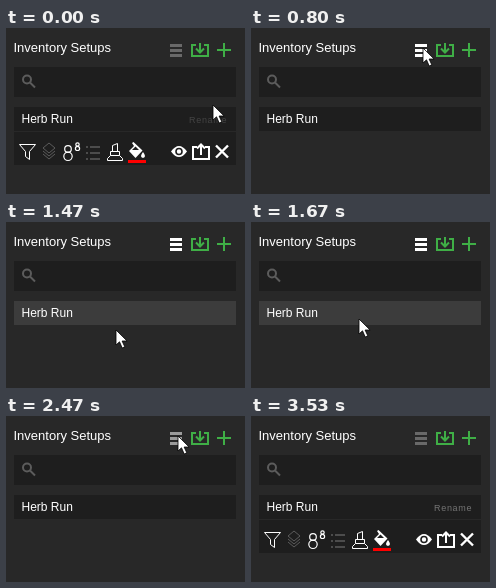
An HTML page for the animation above (4.14 s loop, 239 px wide and 166 px high).

```html
<!DOCTYPE html>
<html lang="en">
<head>
<meta charset="utf-8">
<title>Inventory Setups</title>
<style>
  html, body { margin: 0; width: 100%; height: 100%; overflow: hidden; background: #282828; }
  svg { display: block; width: 100%; height: 100%; }
  text { font-family: "Liberation Sans", Arial, sans-serif; fill: #fff; }
  .line { fill: none; stroke: #fff; }
  .green { fill: none; stroke: #3fae46; stroke-width: 2; }
  .dim { fill: none; stroke: #5c5c5c; }
</style>
</head>
<body>
<svg viewBox="0 0 239 166">
  <rect width="239" height="166" fill="#282828"/>
  <text x="7.5" y="24" font-size="13">Inventory Setups</text>
  <path id="menu" d="M164 16h12v3h-12zM164 21h12v3h-12zM164 26h12v3h-12z"/>
  <path class="green" d="M190 17h-4v11h16v-11h-4M194 15v9M190 20.5l4 4 4-4"/>
  <path class="green" d="M211 22h14M218 15v14"/>

  <rect x="8" y="39" width="222" height="30" fill="#1e1e1e"/>
  <g class="dim" stroke-width="2">
    <circle cx="21" cy="51.5" r="4"/>
    <path d="M24 54.5l5 5"/>
  </g>

  <rect id="row" x="8" y="79" width="222" height="24"/>
  <text x="15.5" y="95" font-size="12">Herb Run</text>

  <g id="details">
    <text id="rename" x="183" y="95" font-size="9" letter-spacing=".7">Rename</text>
    <rect x="8" y="104" width="222" height="33" fill="#1e1e1e"/>
    <path class="line" d="M13.5 116.5h16l-6 7v8l-4-3v-5z"/>
    <path class="dim" d="M43 115l6 5-6 5-6-5zM37 123l6 5 6-5M37 126l6 5 6-5"/>
    <g class="line" stroke-width="1.2">
      <circle cx="62" cy="121" r="3.3"/>
      <circle cx="62" cy="128.3" r="4.2"/>
      <circle cx="71.5" cy="116.5" r="1.7"/>
      <circle cx="71.5" cy="120.4" r="2.1"/>
    </g>
    <path class="dim" stroke-width="1.5" d="M80 119h2m2 0h10M80 125h2m2 0h10M80 131h2m2 0h10"/>
    <path class="line" d="M106.5 123.5v-6l5-2v8M104.5 127.5v-4h9v4M101.5 132.5v-2l3-3h9l3 3v2z"/>
    <path fill="#fff" d="M126 115l1.5-1 9 8.5-7 7.5-6.5-7 5-5zM137 124q4 5 0 6-4-1 0-6z"/>
    <path fill="#1e1e1e" d="M126 122l3.5-3.5 3.5 3.5z"/>
    <rect x="122" y="132" width="18" height="3" fill="#f00"/>
    <path fill="#fff" d="M165 123.5q8-11 16 0-8 11-16 0z"/>
    <circle cx="173" cy="123.5" r="3" fill="#fff" stroke="#1e1e1e" stroke-width="1.6"/>
    <path class="line" stroke-width="2" d="M191 119h-4v12h16v-12h-4M195 127v-10M191 120.5l4-4 4 4"/>
    <path class="line" stroke-width="2.4" d="M210 117.5l12 12M222 117.5l-12 12"/>
  </g>

  <path id="cursor" fill="#fff" stroke="#000" stroke-width=".8"
    d="M0 0v15l3.5-3.2 2.7 6.2 2.6-1.2-2.7-5.8h5z"/>
</svg>
<script>
const LOOP = 4140, TICK = 1000 / 15;
const [menu, row, details, rename, cursor] =
  ["menu", "row", "details", "rename", "cursor"].map(id => document.getElementById(id));

// Pointer path: tick, x, y
const path = [
  [0, 207, 77], [7, 172, 20], [17, 172, 20], [20, 130, 82], [22, 110, 108],
  [25, 108, 97], [28, 108, 97], [36, 172, 20], [41, 172, 20],
  [46, 139, 100], [49, 139, 100], [53, 111, 170], [63, 111, 170]
];
const ease = u => u * u * (3 - 2 * u);
const within = (tick, from, to) => tick >= from && tick < to;

function pointerAt(tick) {
  const next = Math.max(1, path.findIndex(key => key[0] >= tick));
  const [t0, x0, y0] = path[next - 1], [t1, x1, y1] = path[next];
  const u = (tick - t0) / (t1 - t0);
  const p = within(tick, 17, 26) ? u : ease(u);
  return [x0 + (x1 - x0) * p, y0 + (y1 - y0) * p].map(Math.round);
}

function menuColor(tick) {
  if (within(tick, 6, 11) || within(tick, 37, 39)) return "#9b9b9b";
  return within(tick, 11, 37) ? "#fff" : "#696969";
}

function draw(ms) {
  const tick = Math.floor((ms % LOOP + 5) / TICK);
  cursor.setAttribute("transform", `translate(${pointerAt(tick)})`);
  menu.setAttribute("fill", menuColor(tick));
  row.setAttribute("fill", within(tick, 20, 32) ? "#3c3c3c" : "#1e1e1e");
  rename.style.fill = tick < 2 ? "#444" : "#747474";
  details.style.display = within(tick, 12, 39) ? "none" : "";
}

const start = performance.now();
function frame() {
  draw(performance.now() - start);
  requestAnimationFrame(frame);
}
frame();
</script>
</body>
</html>
```
